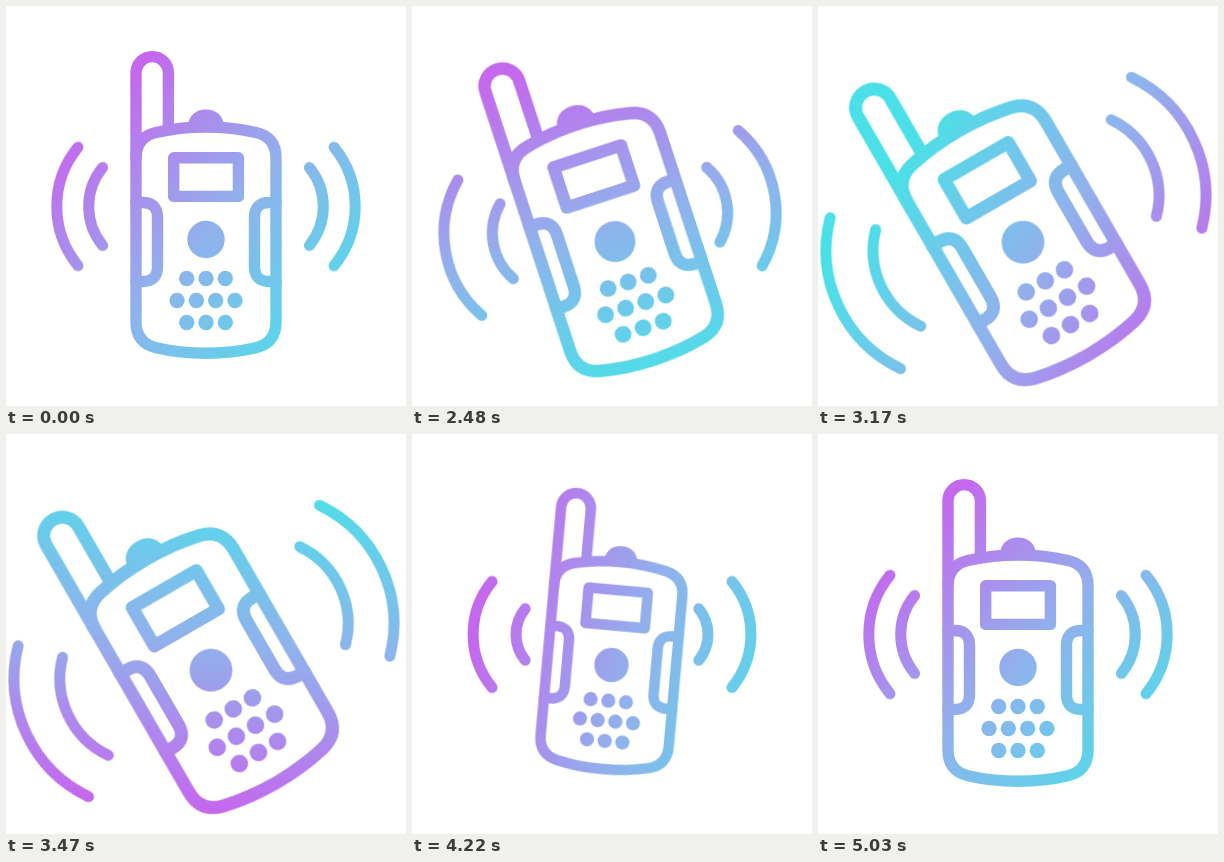
Write an HTML page that moves like this. It is 400 by 400 pixels and loops after 5.06 s.

```html
<!DOCTYPE html>
<html lang="en">
<head>
<meta charset="utf-8">
<title>Walkie-talkie</title>
<style>
  html, body { margin: 0; width: 100%; height: 100%; overflow: hidden; background: #fff; }
  .stage { position: relative; width: 400px; height: 400px; overflow: hidden; isolation: isolate; background: #fff; }
  svg { position: absolute; inset: 0; }

  /* Black artwork on white takes its colour from this turning gradient */
  .tint {
    position: absolute; left: -200px; top: -200px; width: 800px; height: 800px;
    mix-blend-mode: screen;
    background: linear-gradient(90deg, #c468ed calc(50% - 168px), #90b2ec 50%, #4be0e8 calc(50% + 168px));
    animation: turn 5060ms infinite, slide 5060ms ease-in-out infinite;
  }

  .line { fill: none; stroke: #000; stroke-width: 11.4; stroke-linecap: round; stroke-linejoin: round; }
  .device, .waves, .tilt, .wave { animation: 5060ms ease-in-out infinite; }
  .device { transform-origin: 200px 233.5px; animation-name: swing, zoom; }
  .knob { fill: #000; }
  .waves { animation-name: drop; }
  .tilt { animation-name: tilt; }
  .wave { stroke-width: 11; stroke-dasharray: 78.8 281.2; stroke-dashoffset: 39.4; }
  .first { animation-name: spread, leave; }
  .second { animation-name: spread, grow; }
  .third { animation-name: spread, enter; }

  @keyframes turn {
    0% { rotate: 45deg; }
    40.12% { rotate: 45deg; animation-timing-function: cubic-bezier(.33, 0, .4, 1); }
    99.4%, 100% { rotate: 405deg; }
  }
  @keyframes slide {
    0%, 40.12% { transform: translateX(22px); }
    49% { transform: translateX(15px); }
    62.65% { transform: translateX(-45px); }
    73.91% { transform: translateX(25px); }
    83.4% { transform: translateX(35px); }
    99.4%, 100% { transform: translateX(22px); }
  }
  @keyframes swing {
    0%, 40.12% { translate: 0 0; rotate: 0deg; }
    56.52% { translate: 5.2px 3.4px; rotate: -31.5deg; }
    61.46%, 69.96% { translate: 5px 2.7px; rotate: -30deg; }
    83% { translate: -.5px -2.5px; rotate: 5.2deg; }
    88.93%, 100% { translate: 0 0; rotate: 0deg; }
  }
  @keyframes zoom {
    0%, 40.12% { scale: 1; }
    56.52% { scale: 1.165; }
    61.46%, 68% { scale: 1.145; }
    83% { scale: .918; }
    88.93%, 100% { scale: 1; }
  }
  @keyframes drop {
    0%, 40.12% { transform: translate(200px, 200.5px); }
    49.01%, 73.91% { transform: translate(198px, 217px); }
    83.4%, 100% { transform: translate(200px, 200.5px); }
  }
  @keyframes tilt {
    0%, 40.12% { transform: rotate(0deg); }
    60.28%, 70.75% { transform: rotate(-25deg); }
    83.4%, 100% { transform: rotate(0deg); }
  }
  @keyframes spread {
    0%, 42.5% { cx: 56px; }
    60.28%, 70.75% { cx: 65px; }
    83.4% { cx: 55.5px; }
    92.89%, 100% { cx: 56px; }
  }
  @keyframes leave {
    0%, 40.5% { r: 93.2px; opacity: 1; }
    60.28% { r: 133px; }
    62.65% { r: 131px; }
    72.3% { r: 131px; opacity: 1; }
    72.31%, 100% { r: 131px; opacity: 0; }
  }
  @keyframes grow {
    0%, 40.12% { r: 61.3px; }
    47% { r: 59px; }
    61.46% { r: 84px; }
    73.91% { r: 86px; }
    83.4% { r: 83.4px; }
    88.14% { r: 105px; }
    92.89%, 100% { r: 93.2px; }
  }
  @keyframes enter {
    0%, 79.83% { r: 30px; opacity: 0; }
    79.84% { r: 30px; opacity: 1; }
    83.4% { r: 40.5px; }
    88.14% { r: 67px; }
    92.89%, 100% { r: 61.3px; opacity: 1; }
  }
</style>
</head>
<body>
<div class="stage">
  <svg width="400" height="400" viewBox="0 0 400 400">
    <g class="waves line">
      <g class="tilt">
        <g>
          <circle class="wave first" cx="56" r="93.2" pathLength="360"/>
          <circle class="wave second" cx="56" r="61.3" pathLength="360"/>
          <circle class="wave third" cx="56" r="30" pathLength="360"/>
        </g>
        <g transform="scale(-1 1)">
          <circle class="wave first" cx="56" r="93.2" pathLength="360"/>
          <circle class="wave second" cx="56" r="61.3" pathLength="360"/>
          <circle class="wave third" cx="56" r="30" pathLength="360"/>
        </g>
      </g>
    </g>
    <g class="device">
      <g class="line">
        <path class="knob" d="M187.7 121C187.7 113 193 109.3 200 109.3S212.3 113 212.3 121"/>
        <path d="M130 152V66.8a16.2 16.2 0 0 1 32.4 0V124"/>
        <path d="M130 152C130 138 137 129.5 150 126.5Q174 121 200 121Q226 121 250 126.5C263 129.5 270 138 270 152V316C270 330 263 338.5 250 341.7Q226 347.2 200 347.2Q174 347.2 150 341.7C137 338.5 130 330 130 316Z"/>
        <path d="M167.7 151.7H232.4V190.4H167.7Z"/>
        <path d="M130 196.5h6.5q15 0 15 15v49q0 15 -15 15h-6.5"/>
        <path d="M270 196.5h-6.5q-15 0 -15 15v49q0 15 15 15h6.5"/>
      </g>
      <circle cx="200" cy="233.5" r="18.7"/>
      <g id="dots"></g>
    </g>
  </svg>
  <div class="tint"></div>
</div>
<script>
  // Speaker holes: rows of three, four and three
  const dots = [3, 4, 3].flatMap((count, row) =>
    Array.from({ length: count }, (_, i) => {
      const x = 200 + (i - (count - 1) / 2) * 19.3;
      return `<circle cx="${x}" cy="${272.5 + row * 22}" r="7.7"/>`;
    }));
  document.getElementById("dots").innerHTML = dots.join("");
</script>
</body>
</html>
```
